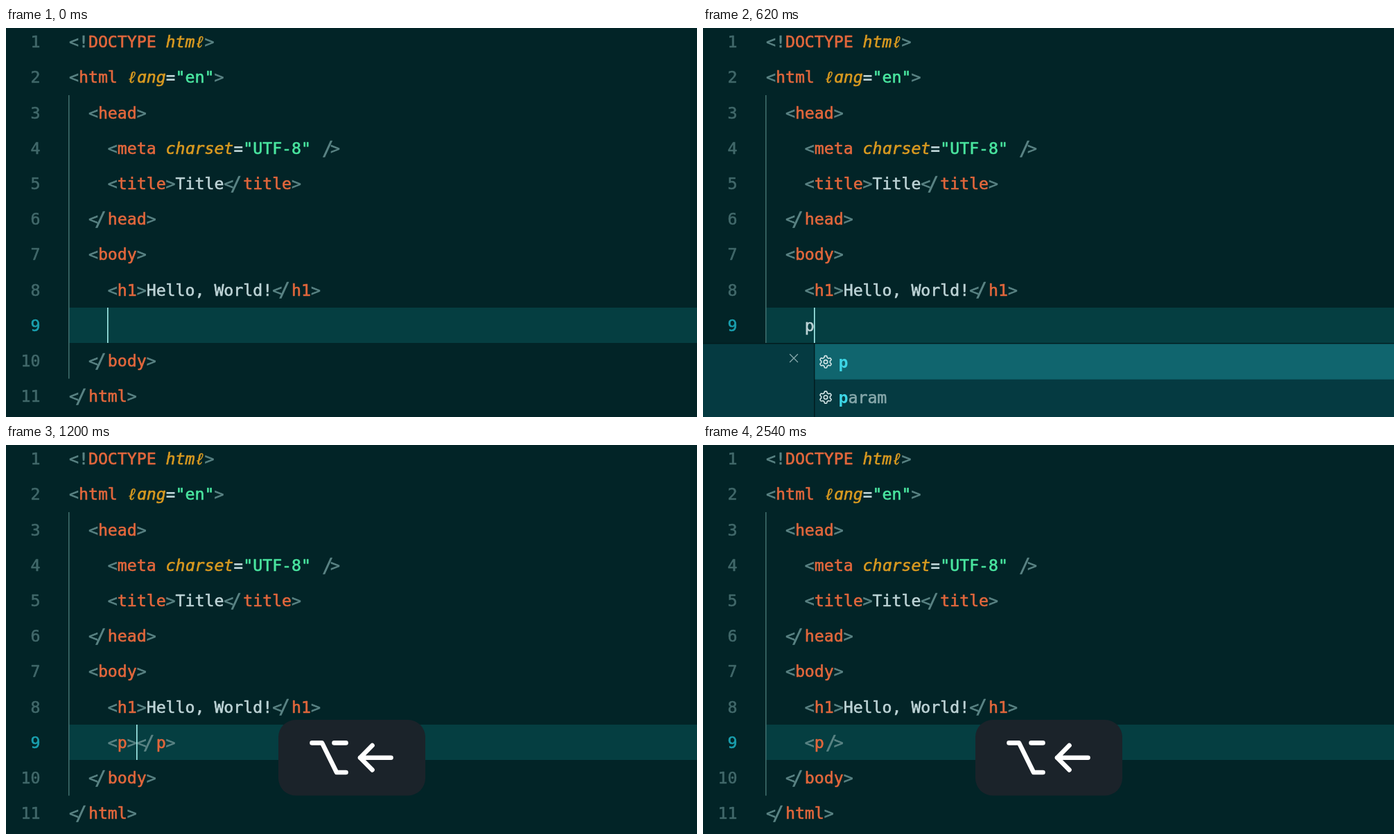
These frames come from a looping animation (997 px wide and 562 px high, 2.6 s). An HTML page with a canvas:

```html
<!DOCTYPE html>
<html lang="en">
<head>
<meta charset="utf-8">
<title>Self-closing tag</title>
<style>
  html, body { margin: 0; width: 100%; height: 100%; overflow: hidden; background: #022427; }
  canvas { display: block; }
</style>
</head>
<body>
<canvas id="stage" width="997" height="562"></canvas>
<script>
const ctx = document.getElementById('stage').getContext('2d');
const LOOP = 2600, ROW = 51.2, CELL = 13.96, LEFT = 91, ACTIVE = 9, SIZE = 23.2;
const COLOR = {
  back: '#022427', row: '#053e41', guide: '#41706f', caret: '#a5efec',
  number: '#41686a', active: '#1a9fae', text: '#bdd3d6', punct: '#5b8485',
  tag: '#e2673c', attr: '#d99a20', string: '#4ae6a0',
  popup: '#053a41', selected: '#10656e', edge: '#021c1f', match: '#3dd6e6', rest: '#86a7aa', key: '#1b232a'
};
const LINES = [
  '<!DOCTYPE html>',
  '<html lang="en">',
  '  <head>',
  '    <meta charset="UTF-8" />',
  '    <title>Title</title>',
  '  </head>',
  '  <body>',
  '    <h1>Hello, World!</h1>',
  '',
  '  </body>',
  '</html>'
];
const TOKENS = /(?<punct><[!\/]?|\/?>)|(?<string>"[^"]*")|(?<equals>=)|(?<tag>(?<=<[!\/]?)\w+)|(?<attr>(?<= )\w+(?=[=>]))|(?<text>.)/g;
const CURSIVE = { a: 'ɑ', l: 'ℓ' };

const rowTop = n => Math.round(ROW * (n - 1) - 5.6);
const baseline = n => ROW * (n - 1) + 28.2;
const colX = col => LEFT + col * CELL;

function rect(x, y, w, h, color) {
  ctx.fillStyle = color;
  ctx.fillRect(x, y, w, h);
}

function glyph(c, x, y, style, scale = 1) {
  ctx.font = `${style} ${SIZE * scale}px "DejaVu Sans Mono", monospace`;
  ctx.fillText(c, x, y);
  if (style !== 'bold') ctx.strokeText(c, x, y); // medium weight
}

function chars(str, x, y, color, style = '') {
  ctx.fillStyle = ctx.strokeStyle = color;
  ctx.lineWidth = 0.6;
  [...str].forEach((c, i) => {
    const left = x + i * CELL;
    if (c === '/') {
      // the tall slash leans towards its bracket
      const lean = i ? -3.5 : 3.5;
      glyph(c, left - CELL * 0.1 + lean, y + 1.8, style, 1.2);
    } else {
      glyph(style === 'italic' ? CURSIVE[c] || c : c, left, y, style);
    }
  });
}

function codeLine(str, n, plain) {
  for (const m of str.matchAll(TOKENS)) {
    const kind = Object.keys(m.groups).find(k => m.groups[k]);
    const style = { equals: 'bold', attr: 'italic' }[kind];
    chars(m[0], colX(m.index), baseline(n), plain ? COLOR.text : COLOR[kind] || COLOR.text, style);
  }
}

function strokes(width, color, ...lines) {
  ctx.lineWidth = width;
  ctx.strokeStyle = color;
  ctx.lineCap = ctx.lineJoin = 'round';
  ctx.beginPath();
  for (const line of lines) line.forEach(([x, y], i) => i ? ctx.lineTo(x, y) : ctx.moveTo(x, y));
  ctx.stroke();
}

function gear(x, y) {
  ctx.strokeStyle = '#d5e6e7';
  ctx.lineWidth = 1.6;
  ctx.beginPath();
  for (let i = 0; i < 72; i++) {
    const a = i * Math.PI / 36;
    const r = 7.5 + 1.2 * Math.tanh(3 * Math.cos(6 * a));
    ctx.lineTo(x + r * Math.sin(a), y - r * Math.cos(a));
  }
  ctx.closePath();
  ctx.moveTo(x + 2.7, y);
  ctx.arc(x, y, 2.7, 0, 7);
  ctx.stroke();
}

function popup() {
  rect(0, 455, 997, 107, COLOR.edge);
  rect(0, 456.5, 160, 106, COLOR.popup);
  rect(161.5, 456.5, 836, 106, COLOR.popup);
  rect(161.5, 456.5, 836, 51.2, COLOR.selected);
  strokes(1.4, COLOR.rest, [[125.5, 471.5], [136.5, 482.5]], [[136.5, 471.5], [125.5, 482.5]]);
  ['', 'aram'].forEach((rest, i) => {
    const y = 482.3 + i * ROW;
    gear(177, y);
    chars('p', 195.5, y + 8.5, COLOR.match, 'bold');
    chars(rest, 195.5 + CELL, y + 8.5, COLOR.rest);
  });
}

function keyPanel(x, w) {
  ctx.fillStyle = COLOR.key;
  ctx.beginPath();
  ctx.roundRect(x, 397, w, 109.5, 25);
  ctx.fill();
}

function tabKey() {
  keyPanel(425, 147);
  rect(469, 448, 34, 6.4, '#fff');
  rect(521, 435, 6.8, 33, '#fff');
  ctx.beginPath();
  ctx.moveTo(501.5, 435);
  ctx.lineTo(518, 451.3);
  ctx.lineTo(501.5, 468);
  ctx.fill();
}

function optionLeftKeys() {
  keyPanel(393, 212);
  strokes(6.6, '#fff',
    [[441.5, 430.4], [456, 430.4], [477, 473], [490.5, 473]],
    [[473.5, 430.4], [490.5, 430.4]],
    [[511, 451.7], [555.5, 451.7]],
    [[528.5, 434], [511, 451.7], [528.5, 469.4]]);
}

// smooth 1 to 0 between two times
function fadeOut(t, from, to) {
  const p = Math.min(1, Math.max(0, (t - from) / (to - from)));
  return 1 - p * p * (3 - 2 * p);
}

function draw(t) {
  const typed = t < 580 ? '' : t < 720 ? 'p' : t < 1500 ? '<p></p>' : '<p/>';
  const caretCol = t < 580 ? 0 : t < 720 ? 1 : t >= 1240 && t < 1500 ? 2 : 3;
  const caretAlpha = t < 580 ? fadeOut(t, 5, 140) : fadeOut(t, 2320, 2540);

  rect(0, 0, 997, 562, COLOR.back);
  rect(LEFT, rowTop(ACTIVE), 997, 51, COLOR.row);
  rect(90, rowTop(3), 1.5, 8 * ROW, COLOR.guide);
  LINES.forEach((line, i) => {
    const n = i + 1, label = String(n);
    chars(label, 49.5 - label.length * CELL, baseline(n), n === ACTIVE ? COLOR.active : COLOR.number);
    codeLine(line, n);
  });
  codeLine('    ' + typed, ACTIVE, t < 740);

  ctx.globalAlpha = caretAlpha;
  rect(Math.round(colX(4 + caretCol) - 1), rowTop(ACTIVE), 1.6, 51, COLOR.caret);
  ctx.globalAlpha = 1;

  if (t >= 620 && t < 720) popup();
  if (t >= 720 && t < 1200) tabKey();
  if (t >= 1200) optionLeftKeys();
}

let start;
function tick(now) {
  start ??= now;
  draw((now - start) % LOOP);
  requestAnimationFrame(tick);
}
requestAnimationFrame(tick);
</script>
</body>
</html>
```
